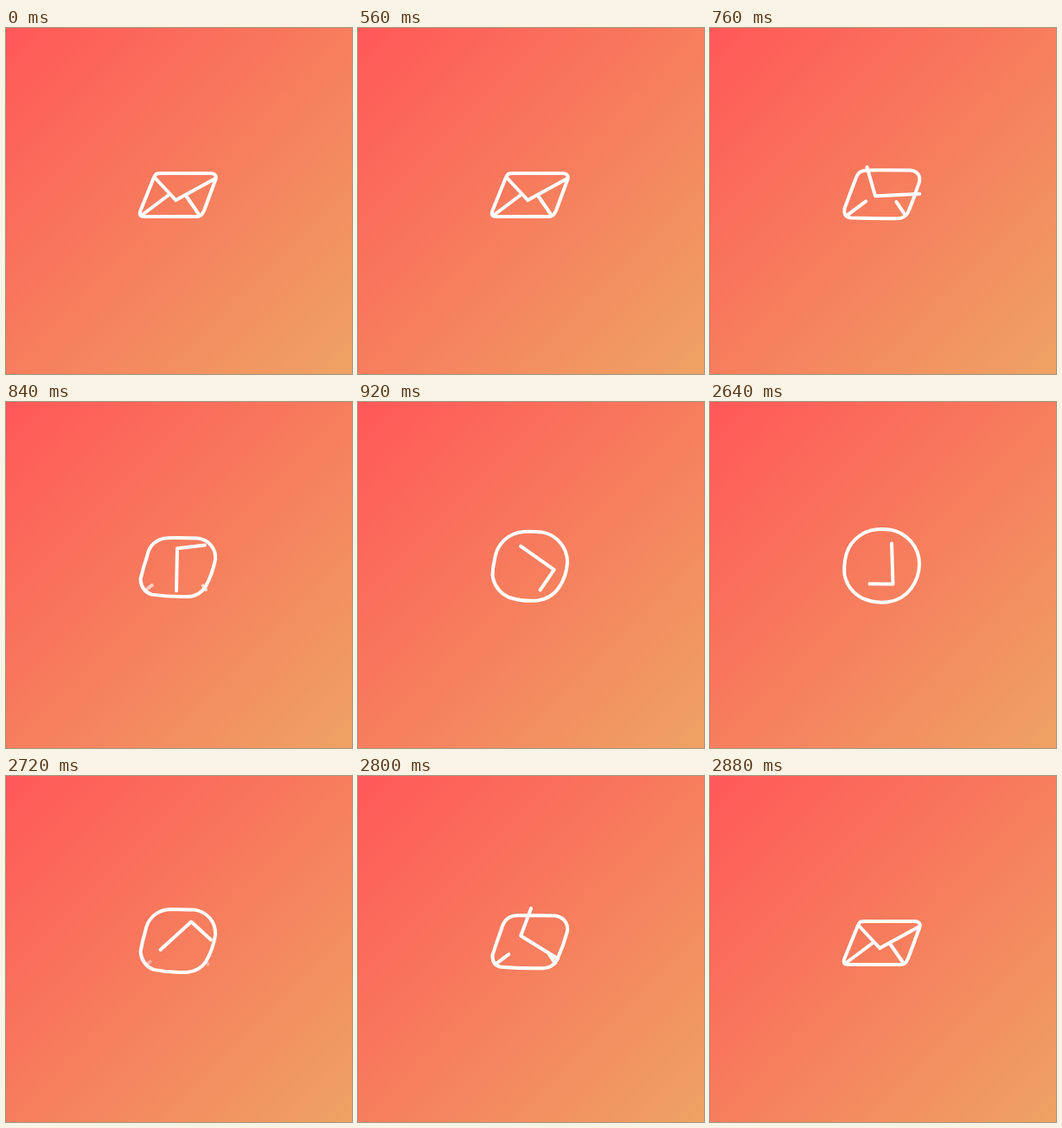
An HTML page that plays this animation: 400 by 400 pixels, repeating every 3240 ms.

```html
<!DOCTYPE html>
<html lang="en">
<head>
<meta charset="utf-8">
<title>Envelope to check</title>
<style>
  html, body { margin: 0; width: 100%; height: 100%; overflow: hidden; }
  svg {
    display: block; width: 100%; height: 100%;
    background: linear-gradient(135deg, #ff5858, #eea363);
  }
  path { fill: none; stroke: #fff; stroke-width: 4; }
</style>
</head>
<body>
<svg viewBox="0 0 400 400">
  <path id="outline" stroke-linejoin="round"/>
  <path id="left"/>
  <path id="right"/>
  <path id="tick"/>
</svg>
<script>
const LOOP = 3240, STEP = 40;
const $ = id => document.getElementById(id);
const clamp = v => Math.min(1, Math.max(0, v));
const mix = (a, b, k) => a.map((v, i) => v + (b[i] - v) * k);
const str = p => p.map(v => v.toFixed(2)).join(' ');
const line = pts => 'M' + pts.map(str).join('L');

// Envelope corners: start, two handles, end; clockwise from top left
const corners = [
  [[170.5, 174], [173, 168], [174, 168], [179, 168]],
  [[236, 168], [242, 168], [244, 171], [242, 176]],
  [[229, 211], [226.5, 217], [224, 218], [219, 218]],
  [[160, 218], [154, 218], [154, 215], [155.5, 211]]
];
const envelope = corners.flatMap((c, i) => {
  const next = corners[(i + 1) % 4][0];
  return [c, [c[3], mix(c[3], next, 1 / 3), mix(c[3], next, 2 / 3), next]];
});

// Circle split at matching angles
const angles = [187, 265, 281, 359, 398, 442, 478, 528, 547];
const circle = angles.slice(0, -1).map((deg, i) => {
  const r = 43.8, a = deg * Math.PI / 180, b = angles[i + 1] * Math.PI / 180;
  const h = 4 / 3 * Math.tan((b - a) / 4);
  const at = (t, k) => [
    198.3 + r * (Math.cos(t) - k * Math.sin(t)),
    189 + r * (Math.sin(t) + k * Math.cos(t))
  ];
  return [at(a, 0), at(a, h), at(b, -h), at(b, 0)];
});

const flap = [[172, 173], [196.3, 199], [242, 174]];
const check = [[174.5, 194.5], [195, 210.5], [221.3, 171.5]];
const pivot = [205, 186.7];

function spin([x, y], turn) {
  const a = turn * 2 * Math.PI, c = Math.cos(a), s = Math.sin(a);
  const dx = x - pivot[0], dy = y - pivot[1];
  return [pivot[0] + dx * c - dy * s, pivot[1] + dx * s + dy * c];
}

// Short fold that shrinks towards its outer end
function fold(id, from, to, inner, s) {
  const outer = mix(from, to, s);
  const reach = mix([0, 0], [inner[0] - from[0], inner[1] - from[1]], Math.pow(1 - s, 2.3));
  $(id).setAttribute('d', line([outer, [outer[0] + reach[0], outer[1] + reach[1]]]));
  $(id).setAttribute('opacity', clamp(1.6 - 2 * s));
}

function draw(time) {
  const t = Math.floor(time % LOOP / STEP) * STEP;
  const s = clamp((t - 720) / 250) - clamp((t - 2620) / 255);
  const moving = s > 0 && s < 1;

  const segs = envelope.map((seg, i) => seg.map((p, j) => mix(p, circle[i][j], s)));
  $('outline').setAttribute('d', 'M' + str(segs[0][0]) +
    segs.map(q => 'C' + q.slice(1).map(str).join(' ')).join('') + 'Z');

  const p = Math.pow(s, 1.4);
  const tick = $('tick');
  tick.setAttribute('d', line(flap.map((pt, i) => spin(mix(pt, check[i], p), p))));
  tick.setAttribute('stroke-linejoin', moving ? 'round' : 'miter');
  for (const id of ['tick', 'left', 'right'])
    $(id).setAttribute('stroke-linecap', moving ? 'round' : 'butt');

  fold('left', [156, 217], [167, 218], [189.5, 192], s);
  fold('right', [223, 215.5], [240, 219], [207.5, 193], s);
}

const begin = performance.now();
function tickFrame() {
  draw(Math.max(0, performance.now() - begin));
  requestAnimationFrame(tickFrame);
}
tickFrame();
</script>
</body>
</html>
```
